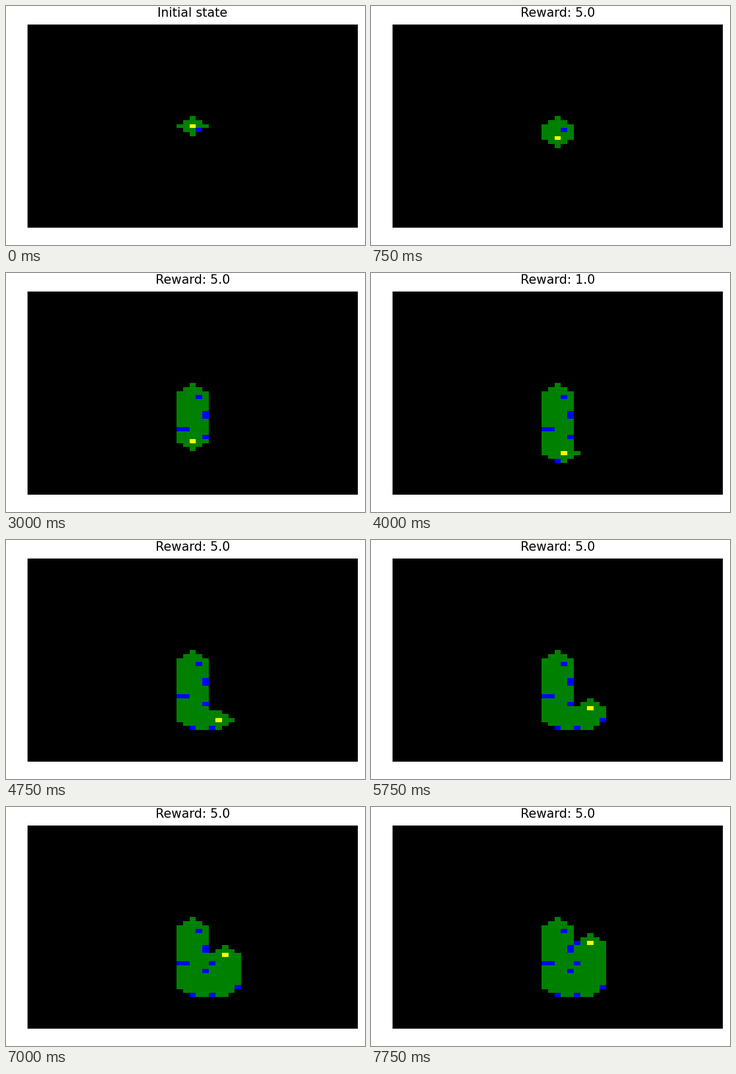
Write a matplotlib script that moves like this. It is 600 by 400 pixels and loops after 8 s.

```python
import numpy as np
import matplotlib.pyplot as plt
from matplotlib.animation import FuncAnimation
from matplotlib.colors import ListedColormap

WIDTH, HEIGHT, DPI = 600, 400, 100
LEFT, TOP, AX_W, AX_H = 36, 31, 552, 340
SIZE = 51
REACH = 2
HIDDEN, FREE, BLOCK, AGENT = range(4)

# Each leg: (row step, column step, number of moves)
LEGS = [(1, 0, 15), (0, 1, 5), (-1, 0, 11)]
BLOCKS = [(26, 26), (30, 27), (31, 27), (34, 23), (34, 24), (36, 27),
          (42, 25), (42, 28), (40, 32), (34, 28), (29, 28)]

path = [(SIZE // 2, SIZE // 2)]
for dr, dc, count in LEGS:
    for _ in range(count):
        r, c = path[-1]
        path.append((r + dr, c + dc))

world = np.full((SIZE, SIZE), FREE)
world[tuple(zip(*BLOCKS))] = BLOCK
grid_r, grid_c = np.indices(world.shape)

# Grid cell under each screen pixel of the map
pixel_rows = ((np.arange(AX_H) + 1) * SIZE / (AX_H + 1)).astype(int)
pixel_cols = ((np.arange(AX_W) + 0.5) * SIZE / AX_W).astype(int)


def in_view(pos):
    return abs(grid_r - pos[0]) + abs(grid_c - pos[1]) <= REACH


def seen_after(step):
    return np.any([in_view(p) for p in path[:step + 1]], axis=0)


def title_text(step):
    if step == 0:
        return "Initial state"
    fresh = seen_after(step).sum() - seen_after(step - 1).sum()
    # New cells count for the move, missing ones count against it
    return f"Reward: {float(2 * fresh - (2 * REACH + 1)):.1f}"


def map_pixels(step):
    cells = np.where(seen_after(step), world, HIDDEN)
    cells[path[step]] = AGENT
    return cells[np.ix_(pixel_rows, pixel_cols)]


fig = plt.figure(figsize=(WIDTH / DPI, HEIGHT / DPI), dpi=DPI, facecolor="white")
ax = fig.add_axes([LEFT / WIDTH, 1 - (TOP + AX_H) / HEIGHT,
                   AX_W / WIDTH, AX_H / HEIGHT])
ax.axis("off")
image = ax.imshow(map_pixels(0), aspect="auto", interpolation="nearest",
                  cmap=ListedColormap(["black", "green", "blue", "yellow"]),
                  vmin=HIDDEN, vmax=AGENT)
title = fig.text(311.8 / WIDTH, 382.1 / HEIGHT, title_text(0), fontsize=15,
                 family="DejaVu Sans", color="black", ha="center", va="baseline")


def update(step):
    image.set_data(map_pixels(step))
    title.set_text(title_text(step))
    return image, title


anim = FuncAnimation(fig, update, frames=len(path), interval=250,
                     repeat=True, repeat_delay=0)
plt.show()
```
